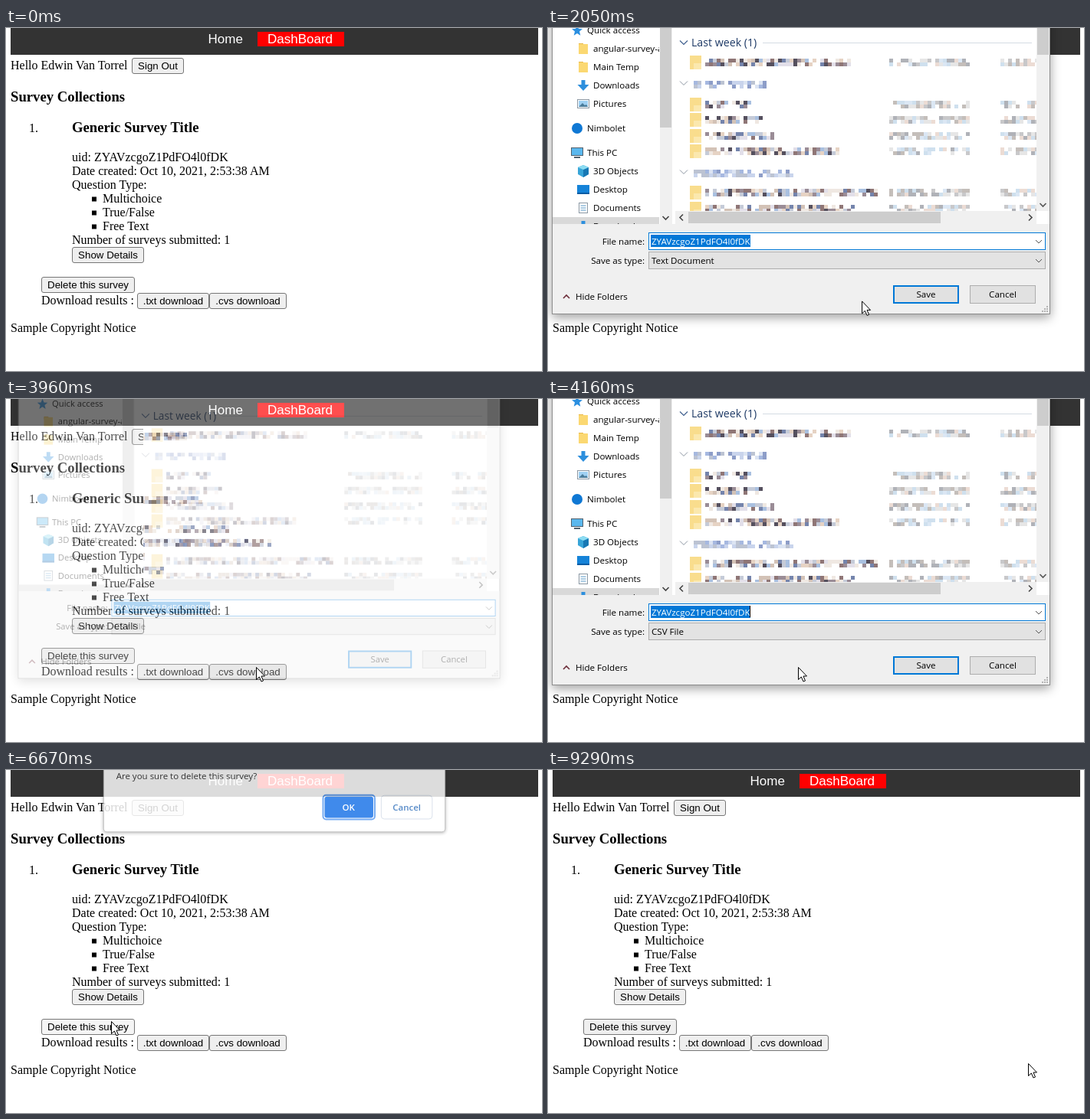
An HTML page for the animation above (9360 ms loop, 699 by 448 pixels).

```html
<!DOCTYPE html>
<html lang="en">
<head>
<meta charset="utf-8">
<title>Survey dashboard</title>
<style>
  html, body { margin: 0; width: 100%; height: 100%; overflow: hidden; background: #fff; }
  svg { display: block; width: 699px; height: 448px; }
  text { font: 16px "Liberation Serif", serif; white-space: pre; }
  .h { font-weight: bold; font-size: 18.72px; }
  .nav { font: 17px "Liberation Sans", sans-serif; fill: #fff; }
  .btn { font: 13.333px "Liberation Sans", sans-serif; }
  .ui { font: 11.6px "Open Sans", sans-serif; }
  .group { font: 14.2px "Open Sans", sans-serif; fill: #1e3a66; }
  .mid { text-anchor: middle; }
  .end { text-anchor: end; }
  .bold { font-weight: 600; }
</style>
</head>
<body>
<svg id="stage" viewBox="0 0 699 448"></svg>
<script>
const LOOP = 9360;

let seed = 7;
const random = () => (seed = (seed * 16807) % 2147483647) / 2147483647;

const rect = (x, y, w, h, fill, extra = '') =>
  `<rect x="${x}" y="${y}" width="${w}" height="${h}" fill="${fill}" ${extra}/>`;
const box = (x, y, w, h, fill, stroke, extra = '') =>
  rect(x + .5, y + .5, w - 1, h - 1, fill, `stroke="${stroke}" ${extra}`);
const text = (x, y, s, cls = '', extra = '') =>
  `<text x="${x}" y="${y}" class="${cls}" ${extra}>${s}</text>`;
const line = (d, stroke = '#555', width = 1) =>
  `<path d="${d}" fill="none" stroke="${stroke}" stroke-width="${width}"/>`;
const shape = (d, fill) => `<path d="${d}" fill="${fill}"/>`;
const chevron = (x, y, size, dir, stroke, width) => {
  const a = { down: [-1, -.5, 1, 1, 1, -1], up: [-1, .5, 1, -1, 1, 1],
              left: [.5, -1, -1, 1, 1, 1], right: [-.5, -1, 1, 1, -1, 1] }[dir].map(v => v * size);
  return line(`M${x + a[0]} ${y + a[1]}l${a[2]} ${a[3]}l${a[4]} ${a[5]}`, stroke, width);
};
const button = (id, x, y, w, label) =>
  box(x, y, w, 21, '#efefef', '#767676', `rx="2.5" id="${id}"`) +
  text(x + w / 2, y + 15, label, 'btn mid');

// Pixelated stand-ins for blurred text
const DARK = ['#55505e', '#9a8c96', '#d3c2b6', '#a9c0e0', '#e2dfe9', '#7484ac', '#efe8e2', '#8f7676', '#c5cbd8', '#e6d3c4'];
const PALE = ['#c8c8ca', '#dbe7f4', '#ecdcd4', '#b0b2b8', '#cfe0ee', '#e6e6e6', '#c4beba'];
const BLUE = ['#a6b8e0', '#c9d4ec', '#8d9dc8', '#dce4f2', '#bcc3d2'];
function mosaic(x0, x1, y, palette) {
  let out = '';
  for (let x = x0; x < x1; x += 5)
    for (const dy of [-5, 0])
      if (random() > .22)
        out += rect(x, y + dy, 5, 5, palette[Math.floor(random() * palette.length)]);
  return out;
}

function page() {
  const lines = ['uid: ZYAVzcgoZ1PdFO4l0fDK', 'Date created: Oct 10, 2021, 2:53:38 AM', 'Question Type:',
    '*Multichoice', '*True/False', '*Free Text', 'Number of surveys submitted: 1'];
  return rect(6, 0, 688, 35, '#333') + rect(328, 5, 113, 19, '#f00') +
    text(263.5, 20, 'Home', 'nav') + text(341, 20, 'DashBoard', 'nav') +
    text(6, 54, 'Hello Edwin Van Torrel') + button('signOut', 164, 39, 68, 'Sign Out') +
    text(6, 96, 'Survey Collections', 'h') +
    text(30, 136, '1.') + text(86, 136, 'Generic Survey Title', 'h') +
    lines.map((s, i) => s[0] === '*'
      ? rect(112, 220.5 + (i - 3) * 18, 6, 6, '#000') + text(126, 174 + i * 18, s.slice(1))
      : text(86, 174 + i * 18, s)).join('') +
    button('details', 86, 286, 94, 'Show Details') +
    button('remove', 46, 325, 122, 'Delete this survey') +
    text(46, 361, 'Download results :') +
    button('txt', 171, 346, 94, '.txt download') + button('cvs', 265, 346, 101, '.cvs download') +
    text(6, 397, 'Sample Copyright Notice');
}

function pageBlur() {
  const rows = [[232, 49], [155, 91], [252, 132], [290, 170], [344, 188], [184, 206], [203, 224], [194, 242]];
  return `<clipPath id="blurClip">${rect(141, 36, 500, 216, '#000', 'id="blurEdge"')}</clipPath>
    <g id="blur" clip-path="url(#blurClip)">${rect(141, 36, 500, 216, '#fff')}
    ${rows.map(([x, y]) => mosaic(141, x, y, DARK)).join('')}</g>`;
}

const icons = {
  star: shape('M0-7l2 5 5 .3-4 3.3 1.3 5.2L0 4l-4.3 2.8L-3 1.6-7-1.7-2-2z', '#2b8fe0'),
  folder: rect(-6, -7, 6, 4, '#e8b84a') + rect(-6, -6, 12, 13, '#fbd872'),
  down: shape('M-2.5-7h5v6h5L0 7-7.500-1h5z', '#2d8fdd'),
  pic: box(-8, -6, 16, 12, '#fff', '#8b98a4') + rect(-6, -4, 12, 8, '#9fd0f2') + shape('M-6 4l5-5 3 3 2-1 2 3z', '#4c7d9b'),
  dot: '<circle r="7" fill="#0f78d4"/>',
  screen: rect(-8, -7, 16, 11, '#52626f') + rect(-7, -6, 14, 9, '#5bb8ee') + rect(-4, 5, 8, 2, '#52626f'),
  cube: shape('M0-8l7 3v9l-7 4-7-4v-9z', '#38a5d8') + shape('M0-2l7-3v9l-7 4z', '#1878b4') + shape('M0-8l7 3-7 3-7-3z', '#8cdcf2'),
  desk: rect(-8, -6, 16, 12, '#1583d8') + rect(-8, 4, 16, 2, '#0b5ca4'),
  doc: box(-6, -7, 12, 14, '#fff', '#8b98a4') + line('M-3.5-3h7M-3.5 0h7M-3.5 3h7', '#5a9ac8'),
  note: shape('M0-7l5 5-1 4-2-4-1 6a3 3 0 1 1-2-2z', '#1e88d8'),
  film: rect(-7, -7, 14, 14, '#4a4a52') + rect(-4, -6, 8, 12, '#8d9fc0'),
  drive: rect(-7, 0, 14, 5, '#70757a') + rect(-6, -2, 12, 2, '#c6cacd'),
  osDrive: rect(-7, 1, 14, 5, '#70757a') + rect(-6, -6, 6, 6, '#1a9be6')
};
// Each entry is "icon|label|y"; a leading dash marks a top level entry.
const tree = items => items.map(item => {
  const shift = item[0] === '-' ? -8 : 0;
  const [icon, label, y] = item.replace(/^-/, '').split('|');
  return `<g transform="translate(${46 + shift} ${y})">${icons[icon]}</g>` + text(59 + shift, +y + 4, label, 'ui');
}).join('');

function fileList() {
  const files = [[395, 45], [265, 100], [280, 120], [295, 141], [380, 161], [430, 215], [400, 236]];
  return chevron(177, 19, 5, 'down', '#41618f', 1.2) + text(187, 24, 'Last week (1)', 'group') +
    line('M280 19.5H631', '#d5dbe3') +
    files.map(([x, y]) => rect(185, y - 9, 15, 18, '#f9dd8d') + rect(190, y + 1, 10, 8, '#fbe8ae') +
      mosaic(205, x, y, DARK) + mosaic(445, 550, y, PALE) + mosaic(590, 637, y, PALE)).join('') +
    [[285, 74], [320, 190]].map(([x, y]) => chevron(177, y - 2, 5, 'down', '#8a93a0', 1) +
      mosaic(190, x, y, BLUE)).join('');
}

function saveDialog() {
  const ready = ['-star|Quick access|3', 'folder|angular-survey-a|27', 'folder|Main Temp|51', 'down|Downloads|75',
    'pic|Pictures|99', '-dot|Nimbolet|131', '-screen|This PC|163', 'cube|3D Objects|187', 'desk|Desktop|211',
    'doc|Documents|235', 'down|Downloads|259'];
  const early = ['-screen|This PC|-5', 'cube|3D Objects|19', 'desk|Desktop|43', 'doc|Documents|67',
    'down|Downloads|91', 'note|Music|115', 'pic|Pictures|139', 'film|Videos|163', 'drive|SSD (A:)|187',
    'osDrive|OS (C:)|211', 'drive|Local Disk (D:)|235', 'drive|RECOVERY (E:)|259'];
  const grip = [[0, 0], [-3, 0], [-6, 0], [0, -3], [-3, -3], [0, -6]]
    .map(([x, y]) => rect(650 + x, 369 + y, 2, 2, '#b5b5b5')).join('');
  return `<clipPath id="treeClip">${rect(5, -90, 140, 346, '#000')}</clipPath>
    <clipPath id="listClip">${rect(163, -90, 474, 329, '#000')}</clipPath>` +
    box(5, -120, 650, 494, '#fff', '#8c8c8c', 'style="filter:drop-shadow(0 4px 7px rgba(0,0,0,.38))"') +
    `<g id="ready">
      <g clip-path="url(#treeClip)">${rect(6, 247, 140, 24, '#d9d9d9')}${tree(ready)}</g>
      ${rect(146, -90, 16, 346, '#f0f0f0')}${rect(146, -90, 15, 220, '#cdcdcd')}
      <g clip-path="url(#listClip)">${fileList()}</g>
    </g>
    <g id="early">
      <g clip-path="url(#treeClip)">${rect(6, 79, 140, 24, '#d9d9d9')}${tree(early)}</g>
      ${rect(146, -90, 16, 346, '#f0f0f0')}${rect(146, 76, 15, 164, '#cdcdcd')}
      ${text(409, 27, 'Working on it...', 'ui mid')}
    </g>` +
    chevron(153.5, 248, 4, 'down', '#444', 1.6) +
    rect(637, -90, 17, 329, '#f0f0f0') + rect(638, -90, 15, 125, '#cdcdcd') +
    chevron(645.5, 231, 4, 'down', '#555', 1.6) +
    rect(166, 239, 471, 17, '#f0f0f0') + rect(183, 240, 329, 15, '#cdcdcd') +
    chevron(174, 247.5, 4, 'left', '#444', 1.6) + chevron(629, 247.5, 4, 'right', '#444', 1.6) +
    rect(6, 256, 648, 117, '#f0f0f0') +
    text(126, 283, 'File name:', 'ui end') + text(126, 308, 'Save as type:', 'ui end') +
    box(131, 267, 518, 23, '#fff', '#0078d7') + box(131, 292, 518, 23, '#e3e3e3', '#adadad') +
    rect(134, 270, 130, 16, '#0078d7', 'id="selection"') +
    text(135, 283, 'ZYAVzcgoZ1PdFO4l0fDK', 'ui', 'id="fileName"') + rect(263, 270, 1, 15, '#000', 'id="caret"') +
    text(135, 308, '', 'ui', 'id="fileType"') +
    chevron(640, 279, 4, 'down') + chevron(640, 304, 4, 'down') +
    rect(451, 337, 84, 22, '#e1e1e1', 'id="save"') + text(493, 352, 'Save', 'ui mid') +
    box(550, 336, 86, 24, '#e1e1e1', '#adadad', 'id="cancel"') + text(593, 352, 'Cancel', 'ui mid') +
    chevron(24, 351, 4, 'up', '#6b2c38', 1.6) + text(36, 355, 'Hide Folders', 'ui') + grip;
}

function confirmDialog() {
  return box(125, -60, 450, 142, '#fff', '#b4b4b4', 'rx="4" style="filter:drop-shadow(0 1px 2px rgba(0,0,0,.35))"') +
    text(142, 12, 'Are you sure to delete this survey?', 'ui', 'fill="#333"') +
    rect(414, 33, 68, 32, '#fff', 'rx="4" stroke="#5b9bf0" stroke-width="2"') +
    rect(416, 35, 64, 28, '#1a73e8', 'rx="3"') + text(447.5, 53, 'OK', 'ui mid bold', 'fill="#fff"') +
    box(490, 33, 68, 32, '#fff', '#d3dce8', 'rx="4" id="keep"') +
    text(524, 53, 'Cancel', 'ui mid bold', 'fill="#3573bd"');
}

const stage = document.getElementById('stage');
stage.innerHTML = page() + pageBlur() + `<g id="saver">${saveDialog()}</g><g id="confirm">${confirmDialog()}</g>` +
  '<path id="cursor" d="M.5.5V16.5L4.300 13 7 19 9.500 18 7 12H11.500Z" fill="#fff" stroke="#000"/>';
const $ = id => document.getElementById(id);
const set = (id, attrs) => { for (const k in attrs) $(id).setAttribute(k, attrs[k]); };
const show = (id, on) => set(id, { visibility: on ? 'inherit' : 'hidden' });

const clamp = v => Math.max(0, Math.min(1, v));
const between = (t, a, b) => t >= a && t < b;
const smooth = p => p * p * (3 - 2 * p);

// time, x, y, easing of the move that ends here
const PATH = [
  [260, 507, 418], [1030, 222, 361], [1640, 222, 361], [2450, 588, 352], [2880, 588, 352], [3540, 326, 350],
  [4160, 326, 350], [4850, 583, 347], [5850, 583, 347], [6260, 137, 328], [7140, 137, 328], [8050, 553, 52],
  [8400, 553, 52], [9210, 587, 292, p => p * p], [9290, 626, 383, p => p], [LOOP, 626, 383]
];
function cursorAt(t) {
  const i = PATH.findIndex(k => k[0] > t);
  const [t0, x0, y0] = PATH[i - 1], [t1, x1, y1, ease = smooth] = PATH[i];
  const p = ease((t - t0) / (t1 - t0));
  return [x0 + (x1 - x0) * p, y0 + (y1 - y0) * p];
}

function popup(id, amount, cx, cy) {
  const s = 1 - .047 * (1 - amount);
  show(id, amount > 0);
  set(id, { opacity: amount, transform: `translate(${cx} ${cy}) scale(${s}) translate(${-cx} ${-cy})` });
}
const presence = (t, open, close, span = 200) => Math.min(clamp((t - open) / span), clamp((close + span - t) / span));

function draw(t) {
  const second = t > 3700;
  const [opened, closed] = second ? [3900, 5760] : [1370, 2716];
  const amount = presence(t, opened, closed);
  popup('saver', amount, 330, 107);
  popup('confirm', presence(t, 6530, 8310, 170), 350, 0);

  show('blur', amount > 0 && amount < 1);
  set('blurEdge', second ? { x: 179, height: 196 } : { x: 141, height: 216 });

  const loading = t < 1640, chosen = t < closed - 60;
  show('early', loading);
  show('ready', !loading);
  show('selection', chosen);
  set('fileName', { fill: chosen ? '#fff' : '#000' });
  show('caret', chosen && t > opened + 150 && Math.floor((t - opened - 150) / 530 + .01) % 2 === 0);
  $('fileType').textContent = second ? 'CSV File' : 'Text Document';
  set('save', { stroke: chosen ? '#0078d7' : '#adadad', 'stroke-width': chosen ? 2 : 1 });
  const over = between(t, 2390, 3300) || between(t, 4780, 6200);
  const [face, edge] = !over ? ['#e1e1e1', '#adadad'] : chosen ? ['#e5f1fb', '#0078d7'] : ['#cce4f7', '#005499'];
  set('cancel', { fill: face, stroke: edge });

  set('txt', { fill: between(t, 980, 3200) ? '#e5e5e5' : '#efefef' });
  set('cvs', { fill: between(t, 3450, 6000) ? '#e5e5e5' : '#efefef' });
  set('remove', { fill: between(t, 6530, 8400) ? '#f5f5f5' : between(t, 6230, 6530) ? '#e5e5e5' : '#efefef' });
  set('keep', { fill: t > 7960 ? '#e8f1fc' : '#fff' });

  show('cursor', t >= 260);
  if (t >= 260) set('cursor', { transform: `translate(${cursorAt(t).join(' ')})` });
}

const start = performance.now();
function tick() {
  draw((performance.now() - start) % LOOP);
  requestAnimationFrame(tick);
}
tick();
</script>
</body>
</html>
```
